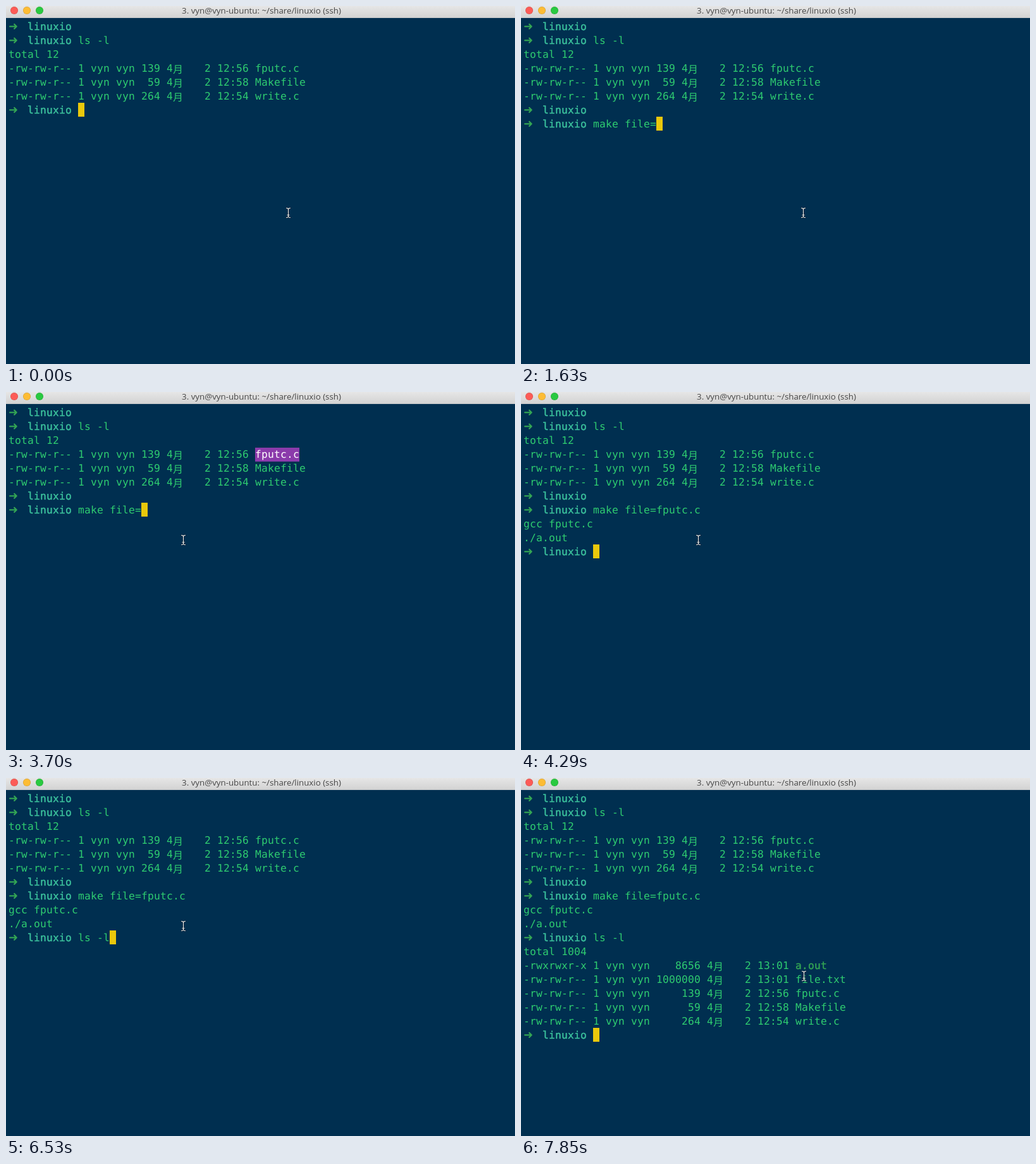
Animation, 805 px wide and 566 px high, one loop 8 s. Source, as an HTML page:

```html
<!DOCTYPE html>
<html lang="en">
<head>
<meta charset="utf-8">
<title>Terminal session</title>
<style>
  html, body { margin: 0; width: 100%; height: 100%; overflow: hidden; background: #002f50; }
  #stage { position: relative; width: 805px; height: 566px; overflow: hidden; background: #002f50; }
  #bar {
    position: absolute; left: 0; top: 0; width: 805px; height: 19px; box-sizing: border-box;
    background: linear-gradient(#e6e6e6, #d3d3d3); border-bottom: 1px solid #c4c6c8;
  }
  #bar i {
    position: absolute; top: 1px; width: 12px; height: 12px; border-radius: 50%;
    box-shadow: inset 0 0 0 .5px rgba(0, 0, 0, .2);
  }
  #bar span {
    position: absolute; left: 0; width: 808px; top: -2px; line-height: 18px; text-align: center;
    font-family: "Open Sans", sans-serif; font-size: 13.3px; color: #474747; white-space: pre;
  }
  #term {
    position: absolute; left: 4px; top: 22px; color: #2ecc70;
    font: 16.3px/22px "DejaVu Sans Mono", monospace; text-rendering: geometricPrecision;
  }
  #term span { position: absolute; white-space: pre; height: 22px; letter-spacing: calc(10px - 1ch); }
  #term .arrow { color: #33a554; font-family: "DejaVu Sans", sans-serif; font-size: 18px; letter-spacing: 0; }
  #term .dir { color: #3cc29d; -webkit-text-stroke: .4px; }
  #term .exe { color: #33a554; -webkit-text-stroke: .4px; }
  #term .wide { font-family: "Noto Sans CJK SC", "Noto Sans CJK", sans-serif; font-size: 16px; letter-spacing: 0; }
  #term .picked { color: #fff; background: #8b3bab; }
  #term .caret { width: 10px; margin-top: -1px; background: #eac80c; }
  #mouse { position: absolute; left: 0; top: 0; }
</style>
</head>
<body>
<div id="stage">
  <div id="bar">
    <i style="left:7px;background:#fc5b56"></i>
    <i style="left:27px;background:#fdbc34"></i>
    <i style="left:47px;background:#29c940"></i>
    <span>3. vyn@vyn-ubuntu: ~/share/linuxio (ssh)</span>
  </div>
  <div id="term"></div>
  <svg id="mouse" width="12" height="20" viewBox="-6 -10 12 20" fill="none" stroke-linecap="round">
    <defs>
      <path id="beam" d="M-3 -7.5Q-.2 -7.5 0 -5.5Q.2 -7.5 3 -7.5M0 -5.5V5.5M-3 7.5Q-.2 7.5 0 5.5Q.2 7.5 3 7.5M-1.5 3.5H1.5"/>
    </defs>
    <use href="#beam" stroke="#0b1c2a" stroke-width="2.2"/>
    <use href="#beam" stroke="#f2f2f2" stroke-width="1.1"/>
  </svg>
</div>
<script>
const LOOP = 8000, BEAT = 147.8;
const CELL = 10, LINE = 22;
const USER = 'vyn';
const term = document.getElementById('term');
const mouse = document.getElementById('mouse');

const file = (mode, size, time, name) => ({ mode, size, time, name });
const built = [
  file('-rwxrwxr-x', 8656, '13:01', 'a.out'),
  file('-rw-rw-r--', 1000000, '13:01', 'file.txt'),
];
const sources = [
  file('-rw-rw-r--', 139, '12:56', 'fputc.c'),
  file('-rw-rw-r--', 59, '12:58', 'Makefile'),
  file('-rw-rw-r--', 264, '12:54', 'write.c'),
];

const output = (at, ...lines) => lines.map(text => ({ at, text }));

function listing(at, total, files) {
  const width = Math.max(...files.map(f => String(f.size).length));
  return output(at, `total ${total}`, ...files.map(f =>
    `${f.mode} 1 ${USER} ${USER} ${String(f.size).padStart(width)} 4月   2 ${f.time} ${f.name}`));
}

// Typing runs from one beat to another; power < 1 starts fast and slows down.
const typing = (text, from, to, power = 1) => beat => {
  const part = Math.min(1, Math.max(0, (beat - from) / (to - from)));
  return text.slice(0, Math.round(text.length * part ** power));
};
const appear = (text, at) => beat => beat >= at ? text : '';
const prompt = (at, ...inputs) => ({ at, inputs });

const rows = [
  prompt(0),
  prompt(0, appear('ls -l', 0)),
  ...listing(0, 12, sources),
  prompt(0),
  prompt(1, typing('make file=', 3, 11), appear('fputc.c', 26)),
  ...output(29, 'gcc fputc.c', './a.out'),
  prompt(29, typing('ls -l', 37, 44, .75)),
  ...listing(45, 1004, [...built, ...sources]),
  prompt(46),
];

// Pointer moves are cubic curves: start, two handles, end.
const moves = [
  { from: 13, to: 20, curve: [[446, 327], [590, 300], [590, 110], [419, 96]] },
  { from: 22, to: 25, curve: [[419, 96], [370, 200], [310, 283], [280, 234]] },
  { from: 47, to: 53, curve: [[280, 234], [430, 170], [690, 270], [447, 313]] },
];
const selection = { from: 21, to: 29, row: 3, token: 'fputc.c' };

function pointer(beat) {
  const { from, to, curve } = moves.findLast(m => beat >= m.from) || moves[0];
  const u = Math.min(1, Math.max(0, (beat - from) / (to - from))), v = 1 - u;
  const [a, b, c, d] = curve;
  return [0, 1].map(i =>
    Math.round(v ** 3 * a[i] + 3 * v * v * u * b[i] + 3 * v * u * u * c[i] + u ** 3 * d[i]));
}

function put(row, col, text, cls = '') {
  const el = document.createElement('span');
  el.className = cls;
  el.textContent = text;
  el.style.left = col * CELL + 'px';
  el.style.top = row * LINE + 'px';
  term.append(el);
}

function putText(row, col, text, beat) {
  const wideAt = text.indexOf('月');
  for (const { 0: token, index } of text.matchAll(/月|[^\s月]+/g)) {
    const shift = wideAt >= 0 && index > wideAt ? 1 : 0;
    const picked = row === selection.row && token === selection.token &&
      beat >= selection.from && beat < selection.to;
    const cls = picked ? 'picked' : token === '月' ? 'wide' : token === 'a.out' ? 'exe' : '';
    put(row, col + index + shift, token, cls);
  }
}

function draw(beat) {
  term.replaceChildren();
  const visible = rows.filter(r => beat >= r.at);
  let caret = [visible.length, 0];
  visible.forEach((line, row) => {
    if (!line.inputs) return putText(row, 0, line.text, beat);
    const text = line.inputs.map(input => input(beat)).join('');
    put(row, 0, '➜', 'arrow');
    put(row, 3, 'linuxio', 'dir');
    putText(row, 11, text, beat);
    if (row === visible.length - 1) caret = [row, 11 + text.length];
  });
  put(...caret, '', 'caret');
  const [x, y] = pointer(beat);
  mouse.style.transform = `translate(${x - 5.5}px, ${y - 10}px)`;
}

const start = performance.now();
let shown = -1;
function tick() {
  const beat = Math.floor((performance.now() - start) % LOOP / BEAT);
  if (beat !== shown) draw(shown = beat);
  requestAnimationFrame(tick);
}
tick();
</script>
</body>
</html>
```
